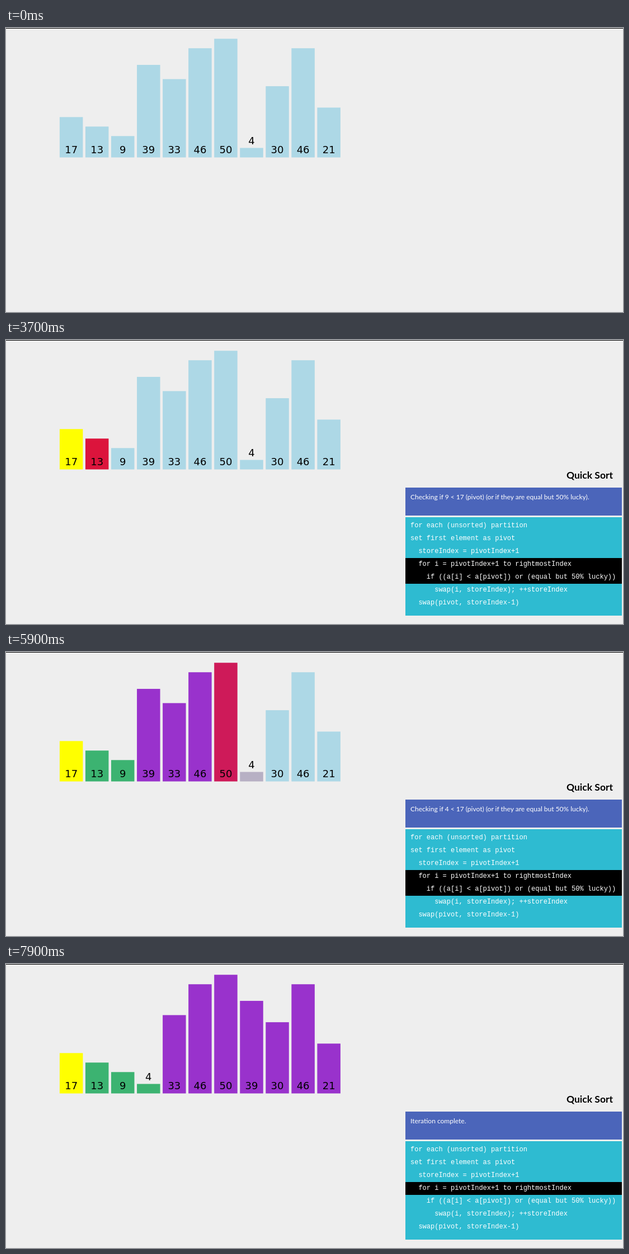
Animation of 1103 by 508 pixels, one loop 8000 ms. Source, as an HTML page:

```html
<!DOCTYPE html>
<html lang="en">
<head>
<meta charset="utf-8">
<title>Quick Sort</title>
<style>
  html, body { margin: 0; width: 100%; height: 100%; overflow: hidden; background: #eee; }
  #stage { position: relative; width: 1103px; height: 508px; overflow: hidden; background: #eee; }
  #rule { position: absolute; left: 0; top: 0; width: 100%; height: 1px; background: #000; }
  svg { position: absolute; left: 0; top: 0; }
  svg text { font: 18px "DejaVu Sans", sans-serif; text-anchor: middle; }
  #title { position: absolute; right: 18px; top: 230px; font: bold 17.5px/24px Lato, sans-serif; white-space: nowrap; }
  .panel { position: absolute; left: 714px; width: 387px; box-sizing: border-box; color: #fff; }
  #status { top: 264px; height: 49.5px; padding: 9px 9px 0; background: #4b65ba; font: 12px/16px Lato, sans-serif; }
  #code { top: 316.5px; height: 176.5px; padding-top: 4px; background: #2ebbd1; }
  #code div { height: 23px; padding-left: 9px; font: 12px/23px "Liberation Mono", monospace; white-space: pre; }
</style>
</head>
<body>
<div id="stage">
  <div id="rule"></div>
  <svg id="chart" width="1103" height="260"></svg>
  <div id="title">Quick Sort</div>
  <div id="status" class="panel"></div>
  <div id="code" class="panel"></div>
</div>
<script>
const LOOP = 8000, SLIDE_START = 1650, SLIDE_TIME = 900;
const FIRST_STEP = 2640, STEP = 350, FADE = 300;
const BASE = 231.5, UNIT = 4.245, LEFT = 95.9, PITCH = 46.05, WIDTH = 41.5;
const BLUE = [173, 216, 230], YELLOW = [255, 255, 0], RED = [220, 20, 60],
      GREEN = [60, 179, 113], PURPLE = [153, 50, 204];
const values = [17, 13, 9, 39, 33, 46, 50, 4, 30, 46, 21];
const codeLines = [
  'for each (unsorted) partition',
  'set first element as pivot',
  '  storeIndex = pivotIndex+1',
  '  for i = pivotIndex+1 to rightmostIndex',
  '    if ((a[i] < a[pivot]) or (equal but 50% lucky))',
  '      swap(i, storeIndex); ++storeIndex',
  '  swap(pivot, storeIndex-1)'
];

const $ = id => document.getElementById(id);
const clamp = x => Math.max(0, Math.min(1, x));
const mix = (a, b, k) => a + (b - a) * k;
const cubic = x => x < 0.5 ? 4 * x ** 3 : 1 - 4 * (1 - x) ** 3;
const swing = x => 0.5 - Math.cos(x * Math.PI) / 2;

// Run the partition once and record every state it passes through.
function buildStates() {
  const states = [], colors = values.map(() => BLUE), slots = values.map((_, i) => i);
  const order = slots.slice();
  const push = (text, lines) =>
    states.push({ text, lines, colors: colors.slice(), slots: slots.slice() });
  const pivot = values[0];
  let store = 1;

  push('', []);
  colors[0] = YELLOW;
  push(`Selecting ${pivot} as pivot. (Therefore, storeIndex = 1.)`, [0, 1, 2]);
  for (let i = 1; i < values.length; i++) {
    const bar = order[i], value = values[bar];
    colors[bar] = RED;
    push(`Checking if ${value} < ${pivot} (pivot) (or if they are equal but 50% lucky).`, [3, 4]);
    if (value >= pivot) {
      colors[bar] = PURPLE;
      continue;
    }
    const other = order[store];
    order[i] = other;
    order[store] = bar;
    slots[other] = i;
    slots[bar] = store;
    push(`Swapping index ${i} (value = ${value}) with element at storeIndex ` +
         `(index = ${store}, value = ${values[other]}).`, [3, 5]);
    colors[bar] = GREEN;
    store++;
  }
  push('Iteration complete.', [3]);
  return states;
}

function add(tag, attrs, parent) {
  const node = document.createElementNS('http://www.w3.org/2000/svg', tag);
  for (const name in attrs) node.setAttribute(name, attrs[name]);
  return parent.appendChild(node);
}

const states = buildStates();

const bars = values.map(value => {
  const group = add('g', {}, $('chart')), height = value * UNIT;
  const rect = add('rect', { y: BASE - height, width: WIDTH, height }, group);
  const label = add('text', { x: WIDTH / 2, y: value < 6 ? 207.5 : 224 }, group);
  label.textContent = value;
  return { group, rect };
});

const rows = codeLines.map(line => {
  const row = document.createElement('div');
  row.textContent = line;
  return $('code').appendChild(row);
});

function render(t) {
  const step = Math.max(0, Math.min(states.length - 1, Math.floor((t - FIRST_STEP) / STEP) + 1));
  const now = states[step], before = states[Math.max(0, step - 1)];
  const k = cubic(clamp((t - FIRST_STEP - (step - 1) * STEP) / FADE));

  bars.forEach(({ group, rect }, i) => {
    const x = LEFT + PITCH * mix(before.slots[i], now.slots[i], k);
    const rgb = now.colors[i].map((c, j) => Math.round(mix(before.colors[i][j], c, k)));
    group.setAttribute('transform', `translate(${x} 0)`);
    rect.setAttribute('fill', `rgb(${rgb})`);
  });

  const shift = 389 * (1 - swing(clamp((t - SLIDE_START) / SLIDE_TIME)));
  for (const id of ['status', 'code']) $(id).style.transform = shift ? `translateX(${shift}px)` : 'none';
  $('title').style.visibility = t < SLIDE_START ? 'hidden' : 'visible';

  if ($('status').textContent !== now.text) $('status').textContent = now.text;
  rows.forEach((row, i) => {
    row.style.background = now.lines.includes(i) ? '#000' : 'none';
  });
}

const start = performance.now();
function tick() {
  render((performance.now() - start) % LOOP);
  requestAnimationFrame(tick);
}
tick();
</script>
</body>
</html>
```
